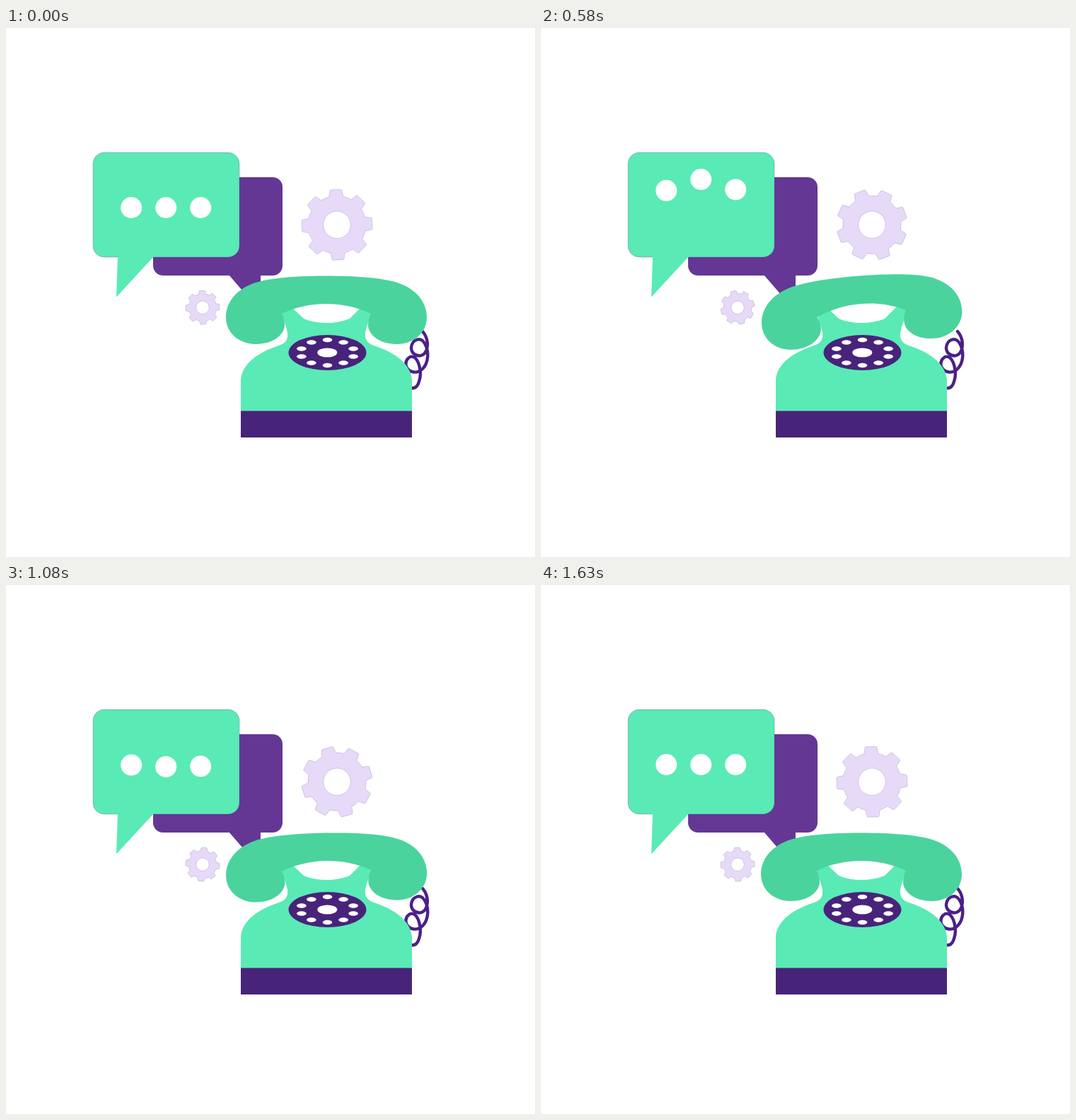
An HTML page for the animation above (1.68 s loop, 748 px wide and 748 px high).

```html
<!DOCTYPE html>
<html lang="en">
<head>
<meta charset="utf-8">
<title>Phone support</title>
<style>
  html, body { margin: 0; width: 100%; height: 100%; overflow: hidden; background: #fff; }
  svg { display: block; width: 100vw; height: 100vh; }
</style>
</head>
<body>
<svg viewBox="0 0 748 748">
  <defs>
    <path id="half" d="M453.5 350.5 C400 350.5 362 355 345 363 C322 373 311 391 311 409
      C311 432 331 447 353 447 C380 447 394 432 394 420 C394 414 392 408 390 404
      C409 395 430 390 453.5 390 Z"/>
  </defs>

  <g fill="#643795">
    <rect x="208" y="211" width="183" height="139" rx="14"/>
    <path d="M315 349 H360 V401 Z"/>
  </g>
  <g fill="#5aeab6">
    <rect x="123" y="176" width="207" height="148" rx="16" stroke="#643795" stroke-opacity=".5" stroke-width=".6"/>
    <path d="M158 322 L156 380.5 L210 322 Z"/>
  </g>
  <g id="dots" fill="#fff"></g>

  <g fill="#e7daf8" fill-rule="evenodd" stroke="#8d7ba6" stroke-opacity=".55" stroke-width=".6" stroke-linejoin="round">
    <path id="big"/>
    <path id="small"/>
  </g>

  <path fill="none" stroke="#4a2088" stroke-width="4.4" stroke-linecap="round"
    d="M589 429 C597 438 598 452 592 460 C585 467 573 462 573 452 C574 440 587 436 592 446
       C599 458 597 474 589 482 C582 489 570 488 566 479 C563 468 573 461 579 467
       C585 473 588 490 584 500 C582 507 578 510 573 509"/>

  <path fill="#5aeab6" d="M332 543 V497 C334 474 358 458 386 449 C396 446 399 440 398 431
    C396 420 391 411 389 399 L402 393 L421 411 C440 419 466 419 486 411 L504 393 L517 399
    C515 411 510 420 508 431 C507 440 511 446 520 449 C548 458 572 474 574 497 V543 Z"/>
  <rect x="332" y="541.5" width="242" height="37.5" fill="#48237a"/>
  <ellipse cx="454.5" cy="459" rx="55" ry="25" fill="#48237a"/>
  <ellipse cx="454.3" cy="459" rx="14" ry="6.6" fill="#fff"/>
  <g id="holes" fill="#fff"></g>

  <g id="handset" fill="#4bd39d">
    <use href="#half"/>
    <use href="#half" transform="translate(906 0) scale(-1 1)"/>
  </g>
</svg>
<script>
  const LOOP = 1680, STEP = 1000 / 24, FRAMES = 40;
  const $ = id => document.getElementById(id);

  function add(parent, tag, attrs) {
    const el = document.createElementNS('http://www.w3.org/2000/svg', tag);
    for (const k in attrs) el.setAttribute(k, attrs[k]);
    return parent.appendChild(el);
  }

  // Eight-toothed wheel with a round hole, centred on the origin.
  function gearPath(size) {
    const at = (x, y, i) => {
      const a = i * Math.PI / 4, c = Math.cos(a), s = Math.sin(a);
      return `${((x * c - y * s) * size).toFixed(2)} ${((x * s + y * c) * size).toFixed(2)}`;
    };
    const body = 41 * size, hole = 19.3 * size;
    let d = '';
    for (let i = 0; i < 8; i++) {
      d += (i ? `A${body} ${body} 0 0 1 ` : 'M') + at(-10, -39.8, i);
      d += `L${at(-8.6, -48, i)}Q${at(-8.4, -49.6, i)} ${at(-7, -49.7, i)}`;
      d += `L${at(7, -49.7, i)}Q${at(8.4, -49.6, i)} ${at(8.6, -48, i)}L${at(10, -39.8, i)}`;
    }
    d += `A${body} ${body} 0 0 1 ${at(-10, -39.8, 0)}Z`;
    return d + `M${hole} 0A${hole} ${hole} 0 1 0 ${-hole} 0A${hole} ${hole} 0 1 0 ${hole} 0Z`;
  }

  // Sine ease between [time, value] keys, held outside them.
  function ease(keys, t) {
    if (t <= keys[0][0]) return keys[0][1];
    for (let i = 1; i < keys.length; i++) {
      const [t0, a] = keys[i - 1], [t1, b] = keys[i];
      if (t < t1) return a + (b - a) * (1 - Math.cos(Math.PI * (t - t0) / (t1 - t0))) / 2;
    }
    return keys[keys.length - 1][1];
  }

  // Steady turn from 0 to 1 with a soft start and stop.
  function turn(t) {
    const total = 1625, ramp = 330, speed = 1 / (total - ramp);
    if (t < ramp) return speed * t * t / (2 * ramp);
    if (t > total - ramp) return 1 - speed * (total - t) ** 2 / (2 * ramp);
    return speed * (t - ramp / 2);
  }

  const hop = [[0, 254], [130, 257.5], [400, 213.5], [840, 257.5], [1190, 253.8], [1330, 254]];
  const swing = [[0, 0], [310, 4], [590, -4.6], [870, 1.4], [1120, -1], [1330, 0]];
  const delays = [0, 150, 290];

  const dots = delays.map((_, i) => add($('dots'), 'circle', { cx: 177.2 + i * 49, cy: 254, r: 15 }));
  for (let i = 0; i < 10; i++) {
    const a = i * Math.PI / 5;
    add($('holes'), 'ellipse', {
      cx: 454.5 + 38.5 * Math.sin(a), cy: 459 - 18 * Math.cos(a), rx: 6.8, ry: 3.2
    });
  }
  $('big').setAttribute('d', gearPath(1));
  $('small').setAttribute('d', gearPath(0.48));

  function draw(ms) {
    const frame = Math.min(FRAMES - 1, Math.floor((ms % LOOP + 4) / STEP));
    const t = frame * STEP, k = turn(t);
    dots.forEach((dot, i) => dot.setAttribute('cy', ease(hop, t - delays[i]).toFixed(2)));
    $('big').setAttribute('transform', `translate(468 278.3) rotate(${-1.8 + 360 * k})`);
    $('small').setAttribute('transform', `translate(278 395.2) rotate(${-1.8 - 180 * k})`);
    $('handset').setAttribute('transform', `rotate(${ease(swing, t)} 453 400)`);
  }

  const start = performance.now();
  function tick() {
    draw(performance.now() - start);
    requestAnimationFrame(tick);
  }
  tick();
</script>
</body>
</html>
```
